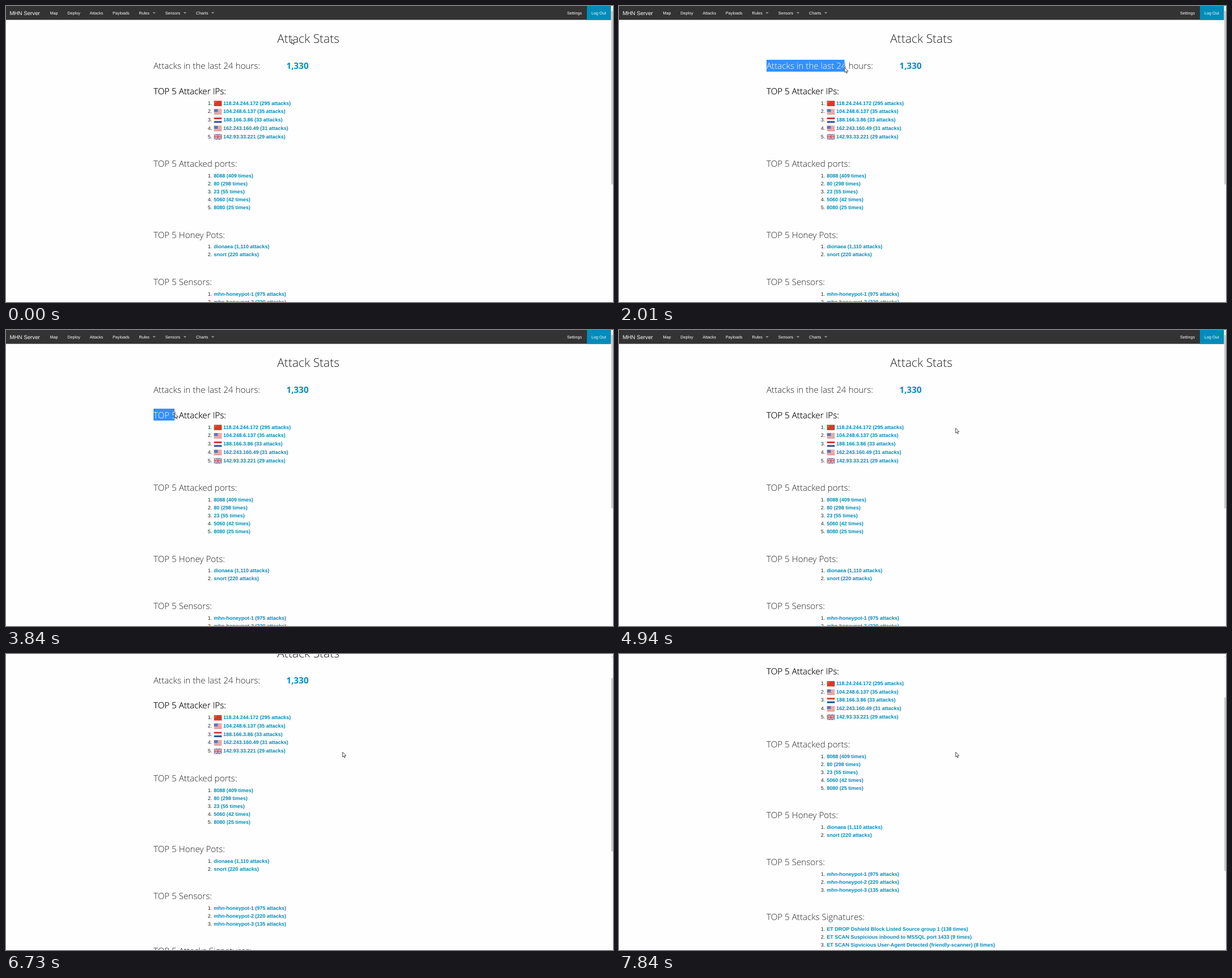
An HTML page that plays this animation: 1070x523 px, repeating every 7.99 s.

```html
<!DOCTYPE html>
<html lang="en">
<head>
<meta charset="utf-8">
<title>Attack Stats</title>
<style>
html, body { margin: 0; width: 100%; height: 100%; overflow: hidden; background: #fefefe; }
svg { display: block; }
text { white-space: pre; text-rendering: geometricPrecision; }
.nav { font: 7.24px "Liberation Sans", Arial, sans-serif; fill: #fff; }
.brand { font: 9.7px "Liberation Sans", Arial, sans-serif; fill: #fff; }
.h2 { font: 300 21px "Open Sans", sans-serif; fill: #222; }
.h3 { font: 300 15.2px "Open Sans", sans-serif; fill: #222; }
.count { font: 700 15.2px "Open Sans", sans-serif; fill: #008cba; }
.num { font: 9px "Liberation Sans", Arial, sans-serif; fill: #222; text-anchor: end; }
.link { font: 700 9px "Liberation Sans", Arial, sans-serif; fill: #008cba; }
#sel text { fill: #fff; }
</style>
</head>
<body>
<svg id="stage" width="1070" height="523" viewBox="0 0 1070 523">
  <defs>
    <g id="cn"><path fill="#d63a28" d="M0 0h13v9H0z"/><path fill="#eaa03c" d="M2 1.6h1.6v1.6H2z"/></g>
    <g id="us">
      <path fill="#f4e4e4" d="M0 0h13v9H0z"/>
      <path stroke="#dc6a66" stroke-width=".8" d="M0 .4h13M0 2.1h13M0 3.8h13M0 5.5h13M0 7.2h13M0 8.6h13"/>
      <path fill="#5a76bc" d="M0 0h6.4v4.8H0z"/>
    </g>
    <g id="nl"><path fill="#cc3d3a" d="M0 0h13v3H0z"/><path fill="#f6f6f6" d="M0 3h13v3H0z"/><path fill="#34529f" d="M0 6h13v3H0z"/></g>
    <g id="gb">
      <path fill="#4560a6" d="M0 0h13v9H0z"/>
      <path stroke="#eee" stroke-width="1.6" d="M0 0L13 9M13 0L0 9"/>
      <path stroke="#d0505a" stroke-width=".6" d="M0 0L13 9M13 0L0 9"/>
      <path stroke="#eee" stroke-width="3" d="M6.5 0v9M0 4.5h13"/>
      <path stroke="#cc3f4a" stroke-width="1.6" d="M6.5 0v9M0 4.5h13"/>
    </g>
  </defs>
  <g id="page">
    <path fill="#333" d="M0 0h1066.500v24.500H0z"/>
    <path fill="#008cba" d="M1024 0h42.500v24.500h-42.500z"/>
    <g id="body"></g>
    <g id="sel"></g>
  </g>
  <path fill="#f8f8f8" d="M1066.500 0h3.500v523h-3.500z"/>
  <path fill="#8a8a8a" d="M1068.300 5.800l.9-1.200.8 1.200z"/>
  <rect id="thumb" x="1067.200" width="2.500" height="306.500" fill="#c1c1c1"/>
  <path id="cursor" fill="#fff" stroke="#222" stroke-width=".8" stroke-linejoin="round"
    d="M.4 .4V9.100L2.400 7.200 3.700 10.300 5 9.700 3.700 6.700H6.500z"/>
</svg>
<script>
const LOOP = 7990, TICK = 137, NS = 'http://www.w3.org/2000/svg';
const $ = id => document.getElementById(id);
const body = $('body');

function add(parent, tag, attrs, text) {
  const el = document.createElementNS(NS, tag);
  for (const k in attrs) el.setAttribute(k, attrs[k]);
  if (text) el.textContent = text;
  return parent.appendChild(el);
}
const label = (cls, x, y, s, parent = body) => add(parent, 'text', { class: cls, x, y }, s);

// Navigation: items flow from the left, menus get a small triangle.
label('brand', 6.5, 15.6, 'MHN Server');
label('nav', 989, 14.7, 'Settings');
label('nav', 1032, 14.7, 'Log Out');
let navX = 77.5;
for (const s of ['Map', 'Deploy', 'Attacks', 'Payloads', 'Rules', 'Sensors', 'Charts']) {
  navX += label('nav', navX, 14.7, s).getComputedTextLength();
  if (/Rules|Sensors|Charts/.test(s)) {
    add(body, 'path', { d: `M${navX + 5.5} 11h5.400l-2.700 2.800z`, fill: '#999' });
    navX += 11.1;
  }
  navX += 16.7;
}

// Sections: a heading, then numbered rows.
const sections = [
  ['Attacker IPs', '118.24.244.172 (295 attacks)', '104.248.6.137 (35 attacks)', '188.166.3.86 (33 attacks)',
    '162.243.160.49 (31 attacks)', '142.93.33.221 (29 attacks)'],
  ['Attacked ports', '8088 (409 times)', '80 (298 times)', '23 (55 times)', '5060 (42 times)', '8080 (25 times)'],
  ['Honey Pots', 'dionaea (1,110 attacks)', 'snort (220 attacks)'],
  ['Sensors', 'mhn-honeypot-1 (975 attacks)', 'mhn-honeypot-2 (220 attacks)', 'mhn-honeypot-3 (135 attacks)'],
  ['Attacks Signatures', 'ET DROP Dshield Block Listed Source group 1 (138 times)',
    'ET SCAN Suspicious inbound to MSSQL port 1433 (9 times)',
    'ET SCAN Sipvicious User-Agent Detected (friendly-scanner) (8 times)']
];
const flags = ['cn', 'us', 'nl', 'us', 'gb'];
let headY = 155.6;
sections.forEach(([name, ...rows], n) => {
  const flagged = n === 0, step = flagged ? 14.75 : 14;
  label('h3', 260, headY, `TOP 5 ${name}:`);
  rows.forEach((s, i) => {
    const y = headY + 18.9 + i * step;
    label('num', 363.3, y, i + 1 + '.');
    label('link', flagged ? 383 : 366.3, y, s);
    if (flagged) add(body, 'use', { href: '#' + flags[i], transform: `translate(366.700 ${y - 7}) scale(1.050)` });
  });
  headY += 55.1 + rows.length * step;
});

// A text with a white-on-blue copy that shows between two x positions.
function selectable(cls, x, y, s, top, h) {
  const w = label(cls, x, y, s).getComputedTextLength(), id = 'clip' + top + x;
  const clip = add(add($('sel'), 'clipPath', { id }), 'rect', { y: top, height: h });
  const g = add($('sel'), 'g', { 'clip-path': `url(#${id})` });
  add(g, 'rect', { x, y: top, width: w, height: h, fill: '#3390ff' });
  label(cls, x, y, s, g);
  return (from, to) => {
    const a = Math.max(x, from);
    clip.setAttribute('x', a);
    clip.setAttribute('width', Math.max(0, Math.min(x + w, to) - a));
  };
}
const title = selectable('h2', 478, 65, 'Attack Stats', 43, 29);
const line = selectable('h3', 260, 111.2, 'Attacks in the last 24 hours:', 95, 21);
const count = selectable('count', 494.3, 111.2, '1,330', 95, 21);
const ips = selectable('h3', 260, 155.6, 'TOP 5 Attacker IPs:', 139, 21);

// Pointer way points: [tick, x, y], straight lines between.
const path = [[0, 503, 58], [1, 629, 54], [3, 629, 54], [4, 607, 74], [8, 562, 98], [10, 375.6, 95], [13, 255, 104],
  [17, 540, 113], [19, 546.5, 112], [22, 491, 105], [24, 447, 137], [25, 329, 145], [27, 257, 146],
  [30, 377, 148], [34, 430, 148], [36, 593, 173]];
// Drags: [first tick, end tick, anchor x, texts].
const drags = [[1, 14, 0, title], [14, 19, 260, line, count], [20, 28, 534, count], [28, 34, 260, ips]];
// Each wheel notch eases the page by the same distance.
const notches = [5407, 6631, 7707], NOTCH = 55.7;

function pointer(n) {
  const i = path.findIndex(k => k[0] > n);
  if (i < 0) return path.at(-1).slice(1);
  const [n0, x0, y0] = path[i - 1], [n1, x1, y1] = path[i], p = (n - n0) / (n1 - n0);
  return [x0 + (x1 - x0) * p, y0 + (y1 - y0) * p];
}

function ease(p) {
  p = Math.min(1, Math.max(0, p));
  return p * p * (3 - 2 * p);
}

// The screen refreshes in even ticks.
function draw(t) {
  const n = Math.floor((t + 44) / TICK), now = n * TICK - 44;
  const [x, y] = pointer(n);
  const scroll = notches.reduce((s, start) => s + NOTCH * ease((now - start) / 240), 0);
  $('cursor').setAttribute('transform', `translate(${x} ${y})`);
  $('page').setAttribute('transform', `translate(0 ${-scroll})`);
  $('thumb').setAttribute('y', 8.5 + scroll * 0.57);
  for (const mark of [title, line, count, ips]) mark(0, 0);
  for (const [from, to, anchor, ...marks] of drags) {
    if (n >= from && n < to) marks.forEach(mark => mark(Math.min(anchor, x), Math.max(anchor, x)));
  }
}

// The title stays marked as a whole while the pointer moves away.
drags[0][3] = () => title(0, 1070);

function tick() {
  draw(performance.now() % LOOP);
  requestAnimationFrame(tick);
}
tick();
</script>
</body>
</html>
```
